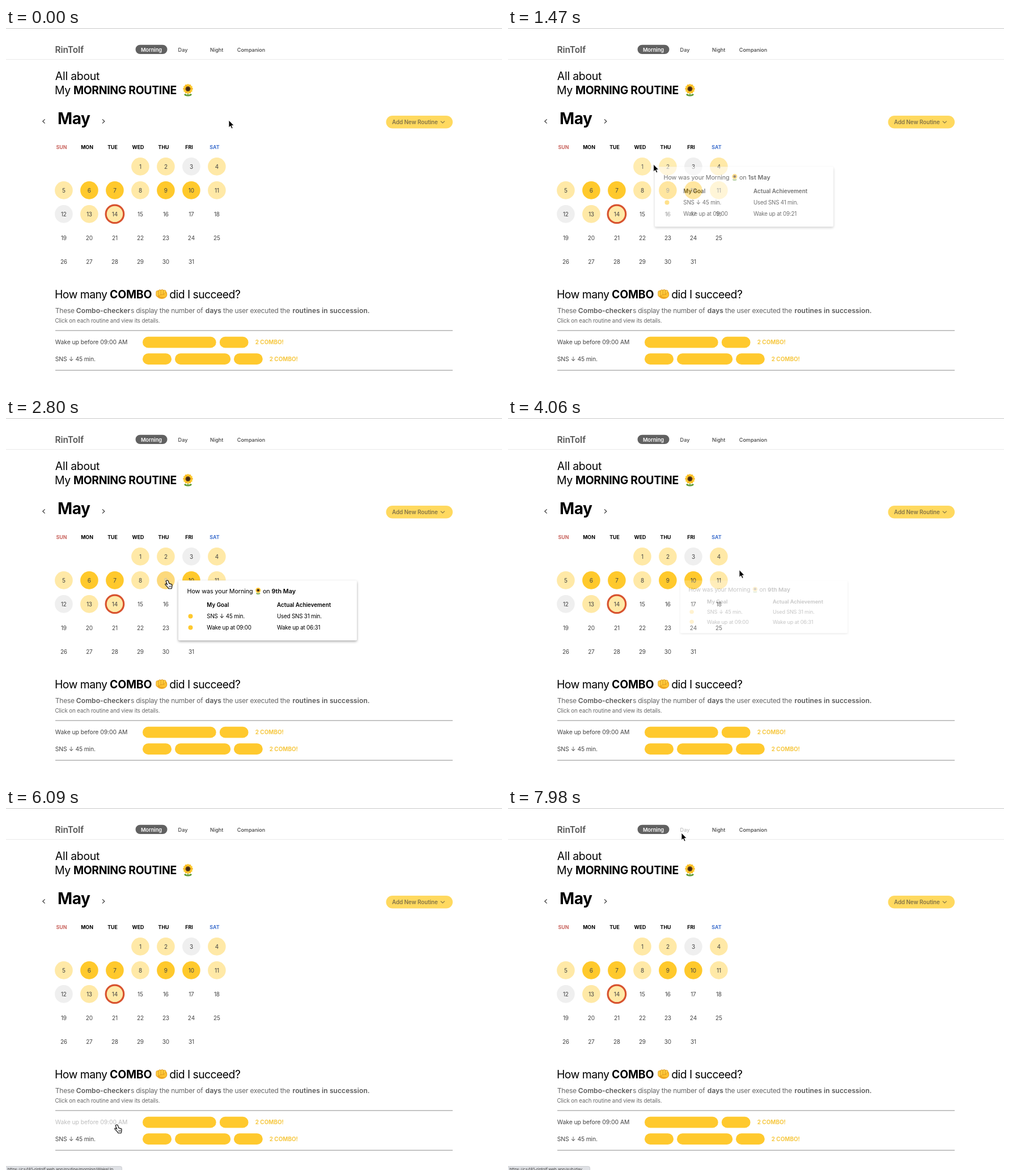
Recreate the animation shown at these times as an HTML page. Size 875 by 640 pixels, loop 8 s.

```html
<!DOCTYPE html>
<html lang="en">
<head>
<meta charset="utf-8">
<title>Morning routine</title>
<style>
  html, body { margin: 0; width: 100%; height: 100%; overflow: hidden; background: #fff; }
  svg { display: block; width: 875px; height: 640px; }
  text { font-family: Inter, "Open Sans", sans-serif; font-optical-sizing: none; }
  .card { filter: drop-shadow(0 2px 2px rgba(0,0,0,.34)); }
</style>
</head>
<body>
<svg id="stage" viewBox="0 0 875 640" xmlns="http://www.w3.org/2000/svg"></svg>
<script>
const LOOP = 8000, STEP = 70, FADE = 242;
const LIGHT = [255, 233, 167], DARK = [255, 201, 44], GREY = [239, 239, 239];
const LIGHT_HOVER = [255, 248, 207], DARK_HOVER = [252, 217, 124];
const INK = [68, 68, 68], FADED = [190, 190, 190];
const rgb = c => `rgb(${c.map(Math.round)})`;
const clamp = v => Math.max(0, Math.min(1, v));
const mix = (a, b, k) => a + (b - a) * k;
const mixColor = (a, b, k) => a.map((v, i) => mix(v, b[i], k));

// Markup helpers
const text = (x, y, s, size, { w = 400, c = '#000', ls = 0, a = 'start', id = '' } = {}) =>
  `<text x="${x}" y="${y}" font-size="${size}" font-weight="${w}" fill="${c}" letter-spacing="${ls}" text-anchor="${a}"${id && ` id="${id}"`}>${s}</text>`;
const pill = (x, y, w, h, c) => `<rect x="${x}" y="${y}" width="${w}" height="${h}" rx="${h / 2}" fill="${c}"/>`;
const line = (d, c, w) => `<path d="${d}" fill="none" stroke="${c}" stroke-width="${w}"/>`;

function sunflower(x, y, scale) {
  let petals = '';
  for (let i = 0; i < 12; i++)
    petals += `<ellipse cy="-5.6" rx="2.1" ry="3.2" fill="${i % 2 ? '#fbb823' : '#ffcf33'}" transform="rotate(${i * 30})"/>`;
  return `<g transform="translate(${x} ${y}) scale(${scale})">
    <path d="M0 6V13" stroke="#4f8a2c" stroke-width="1.8"/>
    <path d="M0 12.6C-3 8.2-5.4 8.6-7 9.8-5.4 12.6-3 13.2 0 12.6 3 13.2 5.4 12.6 7 9.8 5.4 8.6 3 8.2 0 12.6z" fill="#5f9c35"/>
    ${petals}<circle r="4.4" fill="#5a3a1c"/><circle r="2.4" fill="#3d2510"/></g>`;
}

function fist(x, y) {
  let fingers = '';
  for (let i = 0; i < 4; i++)
    fingers += `<rect x="${.8 + i * 4.2}" y="${[3, 1.2, .8, 1.8][i]}" width="4.6" height="${[10, 12, 12, 10][i]}" rx="2.2" fill="#ffcc3d" stroke="#d18a1a" stroke-width=".7"/>`;
  return `<g transform="translate(${x} ${y})">
    <path d="M1 8C1 3 5 1.4 10 1.4 16 1.4 20 4 20 9 20 14 16 17.4 11 17.4 5 17.4 1 14 1 8z" fill="#f3ac28"/>${fingers}
    <path d="M19.4 6.4C17.4 4.8 16 7.2 15 9.2L8 10.4C5.8 10.8 5.8 14 8 14.4L12.6 14.8C16.4 16.6 19.8 13.6 19.8 9.6z" fill="#ffc22f" stroke="#d18a1a" stroke-width=".7"/></g>`;
}

function arrowGoal(x, y, size, c) {
  const k = size / 10.4, o = { c, ls: -.17 };
  return text(x, y, 'SNS', size, o) + text(x + 28.2 * k, y, '↓', size, { c, a: 'middle' }) +
    text(x + 35.6 * k, y, '45 min.', size, o);
}

// Calendar geometry: the month begins on Wednesday
const cellX = d => 101.9 + (d + 2) % 7 * 45;
const cellY = d => 244.9 + Math.floor((d + 2) / 7) * 42;
const darkDays = [6, 7, 9, 10], greyDays = [3, 12];
const dayColor = d => darkDays.includes(d) ? DARK : greyDays.includes(d) ? GREY : LIGHT;

function calendar() {
  let s = '';
  ['SUN', 'MON', 'TUE', 'WED', 'THU', 'FRI', 'SAT'].forEach((n, i) => {
    s += text(98 + 45 * i, 214.2, n, 8.8, { w: 700, a: 'middle', c: i == 0 ? '#c9655f' : i == 6 ? '#4474cf' : '#000' });
  });
  for (let d = 1; d <= 31; d++) {
    const x = cellX(d), y = cellY(d);
    if (d <= 14) s += `<circle id="day${d}" cx="${x}" cy="${y}" r="15.8" fill="${rgb(dayColor(d))}"${d == 14 ? ' stroke="#d8532f" stroke-width="3.2"' : ''}/>`;
    s += text(x, y + 3.6, d, 10, { c: rgb(INK), a: 'middle', ls: -.15, id: 'num' + d });
  }
  return s;
}

const visits = [
  { day: 1, label: '1st May', used: 41, woke: '09:21', ok: [1, 0], from: 736, to: 1390 },
  { day: 2, label: '2nd May', used: 48, woke: '07:42', ok: [0, 1], from: 1500, to: 2330 },
  { day: 9, label: '9th May', used: 31, woke: '06:31', ok: [1, 1], from: 2450, to: 3938 }
];

function tooltip(v) {
  const row = { ls: -.2 }, head = { w: 600 };
  const dot = i => `<circle cx="21.5" cy="${63.2 + i * 20.2}" r="4" fill="${v.ok[i] ? '#ffc92e' : '#eee'}"/>`;
  return `<g id="tip${v.day}" display="none">
    <rect class="card" width="315" height="106" rx="2" fill="#fff"/>
    ${text(15.5, 22.6, 'How was your Morning', 10.8, { ls: -.1 })}${sunflower(140.8, 17.4, .55)}
    ${text(149, 22.6, 'on', 10.8, { ls: -.1 })}${text(164.5, 22.6, v.label, 10.8, head)}
    ${text(50.3, 46.9, 'My Goal', 9.8, head)}${text(174, 46.9, 'Actual Achievement', 9.8, head)}
    ${dot(0)}${dot(1)}
    ${arrowGoal(50.3, 67.1, 9.8, '#000')}${text(174, 67.1, `Used SNS ${v.used} min.`, 9.8, row)}
    ${text(50.3, 87.3, 'Wake up at 09:00', 9.8, row)}${text(174, 87.3, `Wake up at ${v.woke}`, 9.8, row)}</g>`;
}

const YELLOW = '#ffc92e', soft = { c: '#666', ls: -.25 }, strong = { c: '#595959', w: 600, ls: .1 };
const combo = { w: 700, c: '#f6c843' };
const stage = document.getElementById('stage');
stage.innerHTML = `
  <rect width="875" height="640" fill="#fff"/>
  <rect width="875" height="1" fill="#c9c9c9"/>
  <rect y="55" width="875" height="1" fill="#e9e9e9"/>
  ${text(86.4, 44, 'RinTolf', 15.4, { w: 600, c: '#555' })}
  ${pill(228.5, 29.7, 56, 16.4, '#616161')}
  ${text(256.5, 41.8, 'Morning', 9.2, { w: 600, c: '#fff', a: 'middle' })}
  ${text(303.6, 41.8, 'Day', 9.1, { w: 500, c: '#444', id: 'nav' })}
  ${text(360, 41.8, 'Night', 9.1, { w: 500, c: '#444' })}
  ${text(407.8, 41.8, 'Companion', 9.1, { w: 500, c: '#444', ls: -.05 })}
  ${text(86.8, 92.4, 'All about', 19.4, { ls: -.22 })}
  ${text(86, 117.2, 'My', 19.4, { ls: -.3 })}
  ${text(119, 117.2, 'MORNING ROUTINE', 19.4, { w: 700, ls: -.32 })}
  ${sunflower(321, 107.6, 1)}
  ${text(91, 170.2, 'May', 28, { w: 700, ls: -.4 })}
  ${line('M68.6 161.4L64.8 165L68.6 168.6M170 161.4L173.8 165L170 168.6', '#333', 1.2)}
  ${pill(670.5, 155, 117.5, 22.6, '#ffd95f')}
  ${text(681, 170.1, 'Add New Routine', 9.8, { w: 600, c: '#837448', ls: -.05 })}
  ${line('M766.8 164.6L770.3 168L773.8 164.6', '#837448', 1.2)}
  ${calendar()}
  ${text(85.9, 477.6, 'How many', 19.4, { ls: -.55 })}
  ${text(183, 477.6, 'COMBO', 19.4, { w: 700, ls: -.2 })}
  ${fist(264, 461.6)}
  ${text(288.2, 477.6, 'did I succeed?', 19.4, { ls: -.55 })}
  ${text(86.8, 503.6, 'These', 12, soft)}
  ${text(123.8, 503.6, 'Combo-checker', 12, strong)}
  ${text(220, 503.6, 's display the number of', 12, soft)}
  ${text(351.8, 503.6, 'days', 12, strong)}
  ${text(383, 503.6, 'the user executed the', 12, soft)}
  ${text(505.6, 503.6, 'routines in succession.', 12, strong)}
  ${text(86.6, 521, 'Click on each routine and view its details.', 9.7, { c: '#666', ls: -.1 })}
  ${line('M87 534.8H788M87 605.2H788', '#a3a3a3', 1.2)}
  ${text(86.8, 559.3, 'Wake up before 09:00 AM', 10.4, { c: '#444', ls: -.06, id: 'wake' })}
  ${pill(241, 545.8, 129.7, 19.7, YELLOW)}${pill(376.8, 545.8, 50.8, 19.7, YELLOW)}
  ${text(439.8, 559.3, '2 COMBO!', 9.9, combo)}
  ${arrowGoal(86.8, 589.1, 10.4, '#444')}
  ${pill(241, 575.3, 51, 19.7, YELLOW)}${pill(298, 575.3, 98.2, 19.7, YELLOW)}${pill(402, 575.3, 50.8, 19.7, YELLOW)}
  ${text(464.8, 589.3, '2 COMBO!', 9.9, combo)}
  ${visits.map(tooltip).join('')}
  <g id="status"><rect id="bar" x="-4" y="633.5" height="20" rx="3" fill="#dfe1e5" stroke="#c6c8cc" stroke-width=".8"/>
  ${text(2.5, 642, '', 7.5, { c: '#444', ls: -.15, id: 'url' })}</g>
  <path id="arrow" d="M0 0V13L3 10.3L5 15L7.2 14L5.2 9.5H9.2z" fill="#000" stroke="#fff" stroke-width=".9"/>
  <g id="hand"><path d="M4.2 1.2c-.9.3-1 1.2-.7 2.1l2 5.2-1.8-1.2c-.8-.5-1.8-.2-1.9.6-.1.5.2.9.6 1.3l4 4.2c.7 1 1.2 1.6 1.4 2.3h5.2c.1-1 .8-1.8.9-3.2l.1-3.4c0-1-.9-1.4-1.6-1-.1-.8-1-1.1-1.7-.7-.3-.7-1.2-.9-1.8-.5l-1.6-4.6c-.3-.9-1.3-1.4-2.1-1.1z" fill="#fff" stroke="#000" stroke-width="1.1"/>
  <path d="M8.6 10.6l.4 2.8M10.4 10.4l.2 2.9M12.2 10.2v2.9" stroke="#000" stroke-width=".7"/></g>`;

const el = id => document.getElementById(id);
const show = (node, on) => node.setAttribute('display', on ? 'inline' : 'none');

// Pointer path as [time, x, y]
const path = [
  [70, 393, 163], [770, 242, 241], [1050, 240.5, 240], [1330, 240.5, 240], [1680, 286.5, 243],
  [2170, 286.5, 243], [2730, 283.5, 287], [3780, 283.5, 287], [4060, 408, 268.5], [4550, 395, 459],
  [5180, 348, 557], [5320, 347, 558], [5400, 347, 558], [6060, 194.5, 560], [6250, 194.5, 560],
  [7070, 300, 39], [7280, 304, 13], [7700, 307, 43], [7910, 307, 43], [7980, 306, 44]
];
const hands = [[710, 1400], [1490, 2330], [2440, 3900], [5040, 6370]];

function pointer(t) {
  const i = path.findIndex(p => p[0] > t);
  if (i === 0) return path[0].slice(1);
  if (i < 0) return path[path.length - 1].slice(1);
  const [t0, x0, y0] = path[i - 1], [t1, x1, y1] = path[i];
  const k = (t - t0) / (t1 - t0), e = k * k * (3 - 2 * k);
  return [mix(x0, x1, e), mix(y0, y1, e)];
}

// cubic-bezier(.4, 0, .2, 1)
function ease(x) {
  x = clamp(x);
  let lo = 0, hi = 1;
  for (let i = 0; i < 20; i++) {
    const m = (lo + hi) / 2, n = 1 - m;
    if (1.2 * n * n * m + .6 * n * m * m + m ** 3 < x) lo = m; else hi = m;
  }
  return lo * lo * (3 - 2 * lo);
}

const ramp = (t, from, to, d) => Math.min(clamp((t - from) / d), 1 - clamp((t - to) / d));
const tint = (id, a, b, k) => el(id).setAttribute('fill', rgb(mixColor(a, b, k)));

function drawTip(v, t) {
  const tip = el('tip' + v.day), leaving = t >= v.to;
  const k = (t - (leaving ? v.to : v.from)) / FADE;
  const alpha = leaving ? 1 - ease(k) : ease(k);
  const grow = leaving ? 1 - ease((k - .333) / .666) : ease(k / .666);
  const s = mix(.75, 1, grow);
  show(tip, alpha > .001);
  tip.setAttribute('opacity', alpha);
  tip.setAttribute('transform', `translate(${cellX(v.day) + 22.1} ${cellY(v.day) + .3}) scale(${s} ${s * s})`);
  const base = dayColor(v.day), glow = base === DARK ? DARK_HOVER : LIGHT_HOVER;
  const hover = ramp(t, v.from - 70, v.to - 38, 150);
  tint('day' + v.day, base, glow, hover);
  tint('num' + v.day, INK, FADED, hover);
}

function drawStatus(t) {
  const onRow = t >= 5060 && t < 6370, onDay = t >= 7490;
  show(el('status'), onRow || onDay);
  el('bar').setAttribute('width', onRow ? 208.5 : 148.5);
  el('url').textContent = 'https://cs481-rintolf.web.app/' + (onRow ? 'routine/morning/WakeUp' : 'sub/day');
}

function draw(t) {
  visits.forEach(v => drawTip(v, t));
  drawStatus(t);
  tint('wake', INK, FADED, ramp(t, 5790, 6340, 200));
  tint('nav', INK, FADED, ramp(t, 7460, LOOP, 200));
  const [x, y] = pointer(t), hand = hands.some(([a, b]) => t >= a && t < b);
  show(el('hand'), hand);
  show(el('arrow'), !hand);
  el('hand').setAttribute('transform', `translate(${x - 4.5} ${y - 1})`);
  el('arrow').setAttribute('transform', `translate(${x} ${y})`);
}

const start = performance.now();
function tick() {
  const t = (performance.now() - start) % LOOP;
  draw(Math.floor(t / STEP) * STEP);
  requestAnimationFrame(tick);
}
tick();
</script>
</body>
</html>
```
